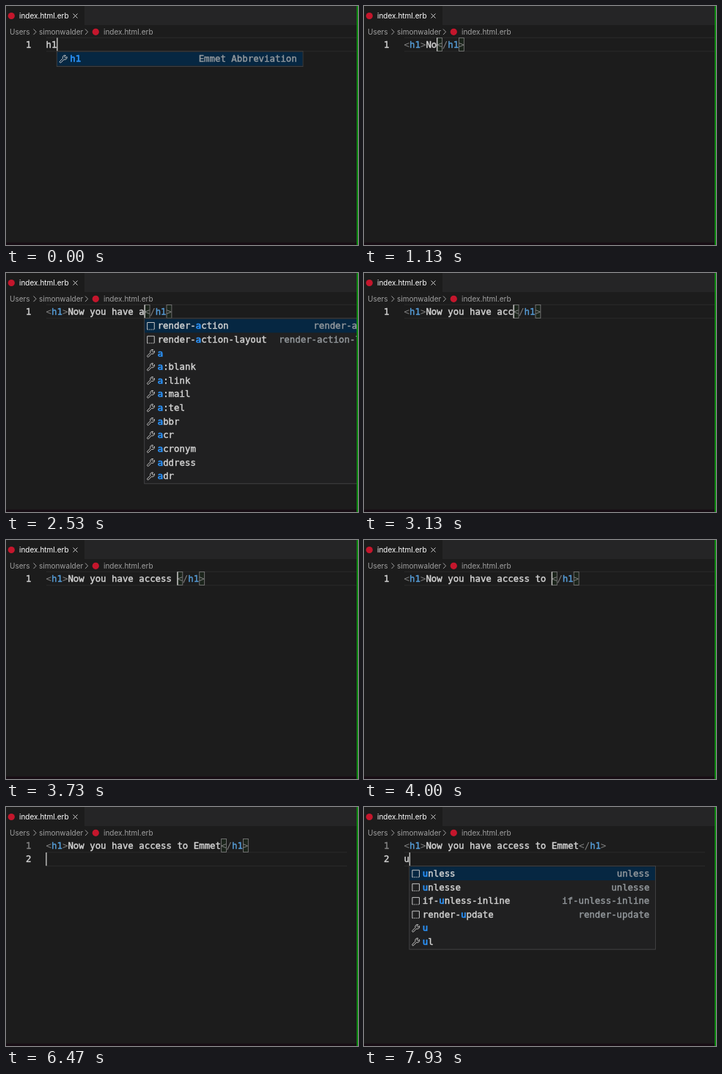
These frames come from a looping animation (480x326 px, 8000 ms). An HTML page:

```html
<!DOCTYPE html>
<html lang="en">
<head>
<meta charset="utf-8">
<title>Editor with abbreviations</title>
<style>
html, body { margin: 0; width: 100%; height: 100%; overflow: hidden; background: #1c1c1c; }
svg { display: block; width: 480px; height: 326px; }
text { white-space: pre; }
.ui { font: 10px Inter, "Open Sans", sans-serif; fill: #a0a0a0; }
.code { font: 12.39px "DejaVu Sans Mono", "Noto Sans Mono", monospace; stroke-width: .4px; }
.text { fill: #d4d4d4; stroke: #d4d4d4; }
.punct { fill: #808080; stroke: none; }
.tag { fill: #569cd6; stroke: #569cd6; }
.match { fill: #2a90f5; stroke: #2a90f5; stroke-width: .7px; }
.dim { fill: #858585; stroke: #858585; }
.detail { fill: #959a9e; stroke: #959a9e; }
.icon { fill: none; stroke: #c5c5c5; stroke-width: 1; }
</style>
</head>
<body>
<svg viewBox="0 0 480 326">
  <rect width="480" height="326" fill="#1c1c1c"/>
  <rect x="107" width="373" height="26" fill="#252526"/>
  <circle cx="7.3" cy="13.5" r="4.6" fill="#c4162c"/>
  <text class="ui" x="18" y="16.8" style="fill:#fff">index.html.erb</text>
  <path d="M91.5 10.5l6 6m0-6l-6 6" stroke="#d0d0d0" fill="none"/>
  <text class="ui" x="5" y="38.8">Users</text>
  <text class="ui" x="45" y="38.8">simonwalder</text>
  <path d="M37.5 31.5l3.6 3.8-3.6 3.8M108 31.5l3.6 3.8-3.6 3.8" stroke="#a0a0a0" fill="none"/>
  <circle cx="122.3" cy="35.3" r="4.6" fill="#c4162c"/>
  <text class="ui" x="133" y="38.8">index.html.erb</text>
  <g id="editor"></g>
  <rect y="322.6" width="480" height="3.4" fill="#170d14"/>
  <rect x="478.2" width="1.8" height="326" fill="#0c8f10"/>
</svg>
<script>
const LOOP = 8000, LEFT = 54.6, CELL = 7.46, ROW = 18.62, TOP = 43.2;
const SENTENCE = "Now you have access to Emmet ";
const editor = document.getElementById("editor");

// [time, letters of the sentence present]
const typing = [
  [70, 0], [930, 1], [1070, 2], [1200, 3], [1270, 4], [1400, 5], [1530, 7], [1670, 8],
  [1870, 9], [1930, 10], [2070, 11], [2200, 12], [2330, 13], [2470, 14], [2930, 15],
  [3070, 16], [3200, 17], [3330, 18], [3470, 19], [3730, 20], [3870, 21], [3930, 22],
  [4000, 23], [4330, 24], [4530, 25], [4670, 26], [4730, 27], [4930, 28], [5270, 29], [5800, 28]
];

// "!" marks a snippet, the rest are abbreviations
const popups = [
  { from: 0, to: 70, query: "h1", rows: "h1" },
  { from: 1870, to: 1930, query: "h", rows: "h1 h2 h3 h4 h5 h6 hdr head header hgroup hr html" },
  { from: 2530, to: 2930, query: "a",
    rows: "!render-action !render-action-layout a a:blank a:link a:mail a:tel abbr acr acronym address adr" },
  { from: 3930, to: 4000, query: "to", rows: "!link-to !button-to" },
  { from: 4400, to: 4530, query: "e",
    rows: "!else !elsif !end !each em emb embed enc ex a:mail area article" },
  { from: 7930, to: 8000, query: "u", rows: "!unless !unlesse !if-unless-inline !render-update u ul" }
];

const blinks = [[600, 930], [5730, 5800], [7000, 7470]];

const within = (t, a, b) => t >= a && t < b;
const colX = col => LEFT + col * CELL;
const lineY = line => TOP + line * ROW;
const span = (cls, s) => `<tspan class="${cls}">${s}</tspan>`;
const code = (x, y, body, cls = "text") =>
  `<text class="code ${cls}" x="${x}" y="${y + 13.5}">${body}</text>`;
const rect = (x, y, w, h, style) =>
  `<rect x="${x}" y="${y}" width="${w}" height="${h}" ${style}/>`;

function lettersAt(t) {
  let n = 0;
  for (const [time, count] of typing) if (t >= time) n = count;
  return n;
}

function lineFrame(line) {
  const y = lineY(line), end = line ? 465 : 478;
  return `<path d="M55 ${y}H${end}M55 ${y + ROW}H${end}" stroke="#2a2a2a" fill="none"/>`;
}

function heading(n) {
  const open = span("punct", "&lt;") + span("tag", "h1") + span("punct", "&gt;");
  const close = span("punct", "&lt;/") + span("tag", "h1") + span("punct", "&gt;");
  return code(LEFT, lineY(0), open + SENTENCE.slice(0, n) + close);
}

function bracketBox(col) {
  return rect(colX(col) + .3, lineY(0) + .3, CELL - .6, ROW - .6,
    'fill="#1b241b" stroke="#777" stroke-width=".9"');
}

function rowIcon(x, y, snippet) {
  return snippet
    ? `<path class="icon" d="M${x + 4} ${y + 14.3}v-9.6h9.6v9.6"/>` +
      `<path class="icon" stroke-dasharray="1.4 1" d="M${x + 4} ${y + 14.3}h9.6"/>`
    : `<path class="icon" transform="translate(${x + 3} ${y + 3.4})"
        d="M1.2 9.2L5.2 5.2A3 3 0 0 1 9 1.2L7.3 3L8.9 4.6L10.7 2.9A3 3 0 0 1 6.7 6.7L2.8 10.8A1.1 1.1 0 0 1 1.2 9.2Z"/>`;
}

function popupRow(item, i, x, y, width, query) {
  const snippet = item[0] === "!";
  const name = snippet ? item.slice(1) : item;
  const detail = snippet ? name : i ? "" : "Emmet Abbreviation";
  const at = name.indexOf(query), end = at + query.length;
  const label = at < 0 ? name : name.slice(0, at) + span("match", name.slice(at, end)) + name.slice(end);
  const labelX = x + 18;
  const detailX = Math.max(x + width - 8 - detail.length * CELL, labelX + name.length * CELL + 16);
  return (i ? "" : rect(x + .5, y, width - 1, ROW, 'fill="#062742"')) +
    rowIcon(x, y, snippet) + code(labelX, y, label) + code(detailX, y, detail, "detail");
}

function popup({ query, rows }, col, line) {
  const items = rows.split(" "), width = 335.6;
  const x = colX(col) - .2, y = lineY(line + 1);
  return rect(x, y, width, items.length * ROW + 2, 'fill="#202021" stroke="#414142"') +
    items.map((item, i) => popupRow(item, i, x, y + 1 + i * ROW, width, query)).join("");
}

function render(t) {
  const n = lettersAt(t);
  const line = t >= 6470 ? 1 : 0;
  const closeCol = 4 + n;
  let col = closeCol;
  if (t < 70) col = 2;
  else if (line) col = t >= 7930 ? 1 : 0;
  else if (t >= 6070) col = closeCol + 5;

  let out = lineFrame(line);
  out += code(27, lineY(0), "1", line ? "dim" : "text");
  if (line) out += code(27, lineY(1), "2");
  if (within(t, 130, 6530)) out += bracketBox(closeCol) + bracketBox(closeCol + 4);
  out += t < 70 ? code(LEFT, lineY(0), "h1") : heading(n);
  if (t >= 7930) out += code(LEFT, lineY(1), "u");
  if (!blinks.some(([a, b]) => within(t, a, b)))
    out += rect(colX(col) - .4, lineY(line) + .2, 1.4, 18.2, 'fill="#c4c4c2"');
  const open = popups.find(p => within(t, p.from, p.to));
  if (open) out += popup(open, col, line);
  return out;
}

let shown = "";
const start = performance.now();
function tick() {
  const next = render((performance.now() - start) % LOOP);
  if (next !== shown) editor.innerHTML = shown = next;
  requestAnimationFrame(tick);
}
tick();
</script>
</body>
</html>
```
